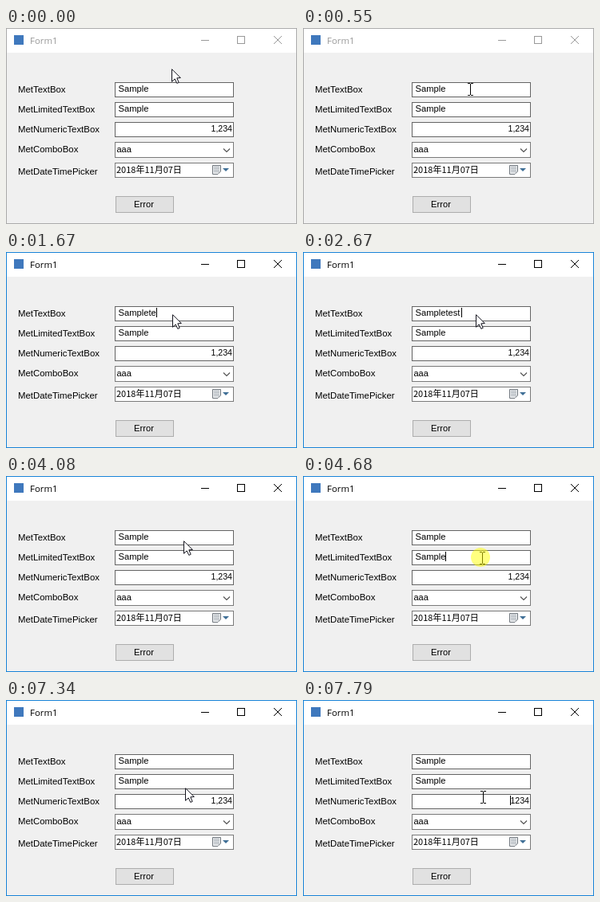
These frames come from a looping animation (364 px wide and 246 px high, 8 s). An HTML page with a canvas:

```html
<!DOCTYPE html>
<html lang="en">
<head>
<meta charset="utf-8">
<title>Form1</title>
<style>
  html, body { margin: 0; width: 100%; height: 100%; overflow: hidden; }
  canvas { display: block; }
</style>
</head>
<body>
<canvas id="stage" width="364" height="246"></canvas>
<script>
const ctx = document.getElementById('stage').getContext('2d');
const LOOP = 8000;
const SANS = '"Liberation Sans", Arial, sans-serif';

// Each cue changes part of the state and holds until the next one.
// pointer: [kind, x, y]; caret: [x, top of the line] or null
const arrow = (x, y) => ['arrow', x, y];
const beam = (x, y) => ['beam', x, y];
const cues = [
  [0, { active: false, first: 'Sample', second: 'Sample', number: '1,234',
        caret: null, glow: false, pointer: arrow(207, 51) }],
  [70, { pointer: arrow(207, 65) }],
  [150, { pointer: beam(207, 71) }],
  [390, { pointer: beam(207, 72) }],
  [470, { pointer: beam(208, 74) }],
  [550, { pointer: beam(209, 77) }],
  [630, { pointer: beam(210, 79) }],
  [940, { active: true, glow: true, caret: [178, 70] }],
  [1030, { glow: false }],
  // typing in the first box, then reset
  [1490, { first: 'Samplet', caret: [182, 70], pointer: null }],
  [1580, { first: 'Samplete', caret: [188, 70] }],
  [1670, { pointer: arrow(208, 78) }],
  [1970, { first: 'Sampletes', caret: [194, 70] }],
  [2040, { pointer: null }],
  [2280, { first: 'Sampletest', caret: [198, 70] }],
  [2670, { pointer: arrow(216, 78) }],
  [2750, { pointer: arrow(220, 78) }],
  [2830, { pointer: arrow(222, 79), caret: null }],
  [3300, { first: 'Sample', caret: [141, 70] }],
  [3850, { caret: null }],
  [4000, { pointer: arrow(222, 80) }],
  [4080, { pointer: arrow(222, 81) }],
  [4230, { pointer: arrow(222, 85) }],
  [4300, { pointer: arrow(222, 91) }],
  [4380, { pointer: beam(224, 100), caret: [141, 70] }],
  [4460, { pointer: beam(224, 103) }],
  // typing in the second box, then reset
  [4680, { glow: true, caret: [178, 95] }],
  [4760, { glow: false }],
  [5220, { second: 'Samplet', caret: [182, 95], pointer: null }],
  [5300, { second: 'Samplete', caret: [188, 95] }],
  [5540, { second: 'Sampletes', caret: [194, 95] }],
  [5760, { second: 'Sampletest', caret: [198, 95] }],
  [6310, { caret: null }],
  [6480, { second: 'Sample', caret: [141, 95] }],
  [7010, { caret: null }],
  [7180, { pointer: arrow(224, 104) }],
  [7260, { pointer: arrow(224, 106) }],
  [7340, { pointer: arrow(224, 110) }],
  [7420, { pointer: arrow(224, 116) }],
  [7490, { pointer: beam(225, 120) }],
  [7550, { caret: [141, 95] }],
  [7630, { pointer: beam(225, 121) }],
  [7710, { pointer: beam(225, 122) }],
  [7790, { number: '1234', caret: [259, 120] }]
];

function stateAt(time) {
  const state = {};
  for (const [start, change] of cues) {
    if (start <= time) Object.assign(state, change);
  }
  return state;
}

function rect(x, y, w, h, color) {
  ctx.fillStyle = color;
  ctx.fillRect(x, y, w, h);
}

function frame(x, y, w, h, border, fill) {
  rect(x, y, w, h, border);
  rect(x + 1, y + 1, w - 2, h - 2, fill);
}

function text(value, x, y, size = 11.2, color = '#000', family = SANS, align = 'left') {
  ctx.font = `${size}px ${family}`;
  ctx.fillStyle = color;
  ctx.textAlign = align;
  ctx.fillText(value, x, y);
}

function path(points, close) {
  ctx.beginPath();
  for (const [x, y] of points) ctx.lineTo(x, y);
  if (close) ctx.closePath();
}

function line(points, color, width = 1) {
  path(points);
  ctx.strokeStyle = color;
  ctx.lineWidth = width;
  ctx.stroke();
}

function drawTitleBar(active) {
  const ink = active ? '#000' : '#999';
  rect(10, 9, 12, 12, '#3f78bd');
  text('Form1', 30, 20, 11.4, ink, '"Open Sans", sans-serif');
  rect(244, 15, 10, 1, ink);
  frame(289, 10, 10, 10, ink, '#fff');
  line([[335, 10], [345, 20]], ink);
  line([[345, 10], [335, 20]], ink);
}

function drawCalendarButton() {
  path([[258.5, 172.5], [268.5, 172.5], [268.5, 180], [265, 183.5], [258.5, 183.5]], true);
  ctx.fillStyle = '#eef0f2';
  ctx.fill();
  ctx.strokeStyle = '#6f767d';
  ctx.lineWidth = 1;
  ctx.stroke();
  for (let y = 174; y < 182; y += 2) rect(260, y, 7, 1, '#a4abb2');
  path([[271, 176], [279, 176], [275, 180]], true);
  ctx.fillStyle = '#3f6f96';
  ctx.fill();
}

function drawForm({ first, second, number }) {
  const labels = [['MetTextBox', 81], ['MetLimitedTextBox', 106],
    ['MetNumericTextBox', 131], ['MetComboBox', 156], ['MetDateTimePicker', 184]];
  for (const [label, y] of labels) text(label, 15, y, 11.4);
  for (const y of [68, 93, 118]) frame(136, y, 149, 19, '#646464', '#fff');
  frame(136, 143, 149, 20, '#7a7a7a', '#fff');
  frame(136, 169, 149, 19, '#7a7a7a', '#fff');

  text(first, 140.5, 80);
  text(second, 140.5, 105);
  text(number, 283, 130, 10.6, '#000', SANS, 'right');
  text('aaa', 138.5, 156, 11);
  line([[272, 151.5], [276, 155.5], [280, 151.5]], '#555', 1.2);
  text('2018年11月07日', 138, 182, 11, '#000', '"Noto Sans CJK JP", "Noto Sans CJK", sans-serif');
  drawCalendarButton();

  frame(137, 211, 73, 21, '#adadad', '#e1e1e1');
  text('Error', 160, 225);
}

function drawPointer([kind, x, y]) {
  if (kind === 'beam') {
    rect(x, y - 7, 1, 14, '#000');
    for (const end of [y - 8, y + 7]) {
      rect(x - 3, end, 3, 1, '#000');
      rect(x + 1, end, 3, 1, '#000');
    }
    return;
  }
  const outline = [[.5, .7], [.5, 16.3], [4.2, 12.9], [6.8, 18.4], [9.2, 17.4], [6.8, 11.8], [11.3, 11.5]];
  path(outline.map(([dx, dy]) => [x + dx, y + dy]), true);
  ctx.fillStyle = '#fff';
  ctx.fill();
  ctx.strokeStyle = '#15151f';
  ctx.lineWidth = 1;
  ctx.stroke();
}

function drawGlow([, x, y]) {
  ctx.beginPath();
  ctx.arc(x - 2, y - 1, 12, 0, Math.PI * 2);
  ctx.fillStyle = 'rgba(255, 255, 0, .5)';
  ctx.fill();
}

function draw(time) {
  const state = stateAt(time);
  frame(0, 0, 364, 246, state.active ? '#1883d7' : '#aaa', '#f0f0f0');
  rect(1, 1, 362, 30, '#fff');
  drawTitleBar(state.active);
  drawForm(state);
  if (state.caret) rect(...state.caret, 1, 12, '#000');
  if (state.pointer) drawPointer(state.pointer);
  if (state.glow) drawGlow(state.pointer);
}

const startTime = performance.now();
function tick() {
  draw((performance.now() - startTime) % LOOP);
  requestAnimationFrame(tick);
}
tick();
</script>
</body>
</html>
```
